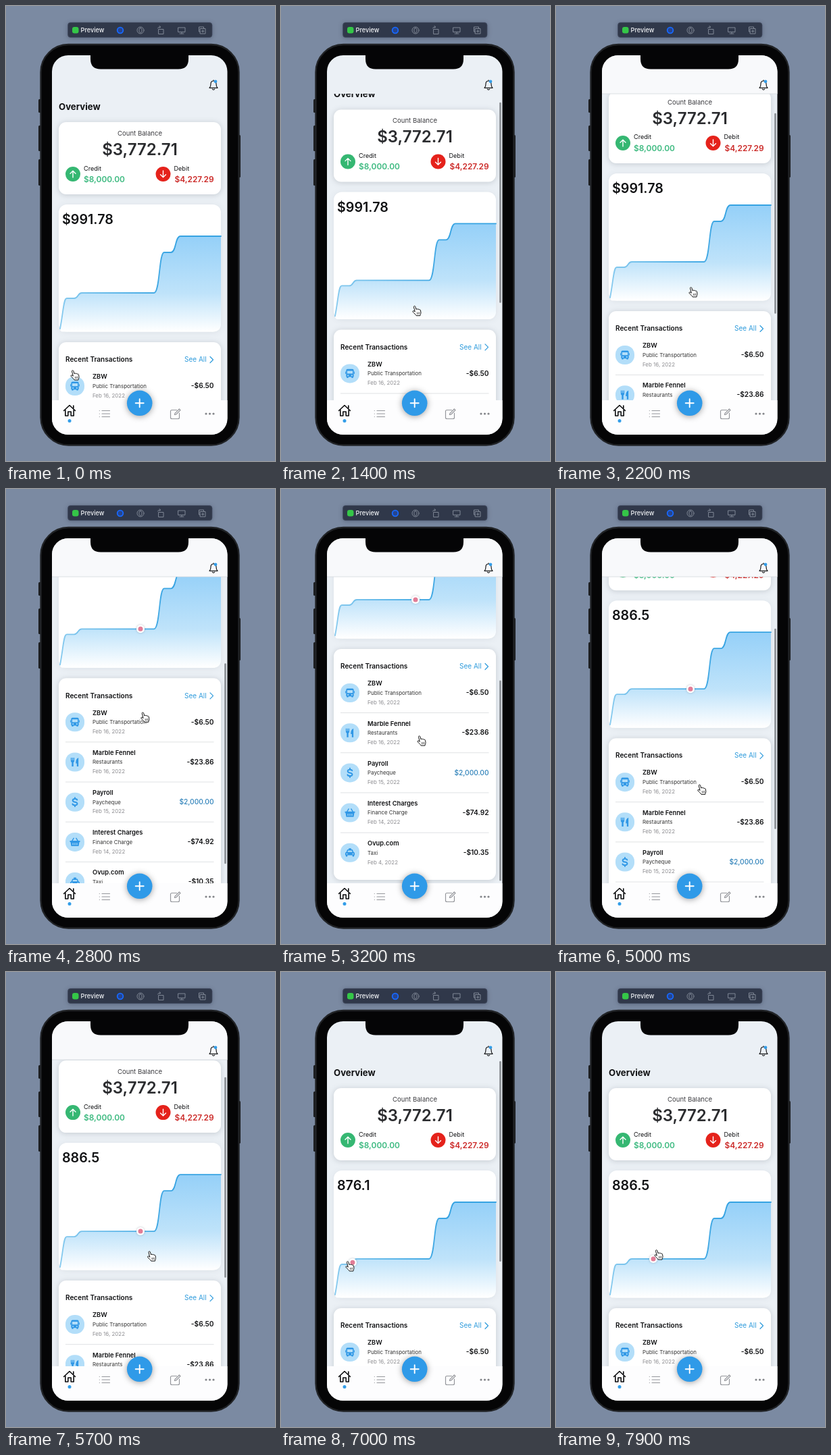
These frames come from a looping animation (398x674 px, 8 s). An HTML page:

```html
<!DOCTYPE html>
<html lang="en">
<head>
<meta charset="utf-8">
<title>Budget overview</title>
<style>
html, body { margin: 0; width: 100%; height: 100%; overflow: hidden; background: #7b8aa2; }
svg { display: block; }
text { font-family: Inter, Roboto, sans-serif; fill: #111214; white-space: pre; }
.semi { font-weight: 600; }
.bold { font-weight: 700; }
.end { text-anchor: end; }
.mid { text-anchor: middle; }
.card { fill: #fff; filter: drop-shadow(0 1.500px 4px rgba(40, 50, 65, .2)); }
.soft { filter: drop-shadow(0 1px 4px rgba(40, 50, 65, .08)); }
.tools { filter: drop-shadow(0 1px 3px rgba(20, 28, 45, .3)); }
.line { fill: none; stroke-linecap: round; stroke-linejoin: round; }
.sub { font-size: 7.95px; fill: #333; }
.date { font-size: 7.95px; fill: #8c8c90; }
.name { font-size: 9.3px; font-weight: 600; }
.amount { font-size: 10.2px; font-weight: 600; text-anchor: end; }
.plus { fill: #2f9ae8; filter: drop-shadow(0 1px 5px rgba(0, 0, 0, .38)); }
</style>
</head>
<body>
<svg width="398" height="674" viewBox="0 0 398 674">
  <defs>
    <clipPath id="screen"><rect x="68" y="73" width="259.500" height="562" rx="24"/></clipPath>
    <clipPath id="view"><rect x="68" y="130" width="259.500" height="454.500"/></clipPath>
    <linearGradient id="area" x1="0" y1="341" x2="0" y2="482" gradientUnits="userSpaceOnUse">
      <stop offset="0" stop-color="#95d0f8"/>
      <stop offset=".6" stop-color="#bfe3fa"/>
      <stop offset="1" stop-color="#fff"/>
    </linearGradient>
    <linearGradient id="stroke" x1="80" y1="0" x2="250" y2="0" gradientUnits="userSpaceOnUse">
      <stop offset="0" stop-color="#85c9ee"/>
      <stop offset="1" stop-color="#36a3e2"/>
    </linearGradient>
    <symbol id="bus" viewBox="-8 -8 16 16" overflow="visible">
      <path fill="#2f97e6" fill-rule="evenodd" d="M-4-7H4Q6-7 6-5V4.500Q6 5.500 5 5.500V7H2.500V5.500H-2.500V7H-5V5.500Q-6 5.500-6 4.500V-5Q-6-7-4-7ZM-4.300-4.300V.2H4.300V-4.300ZM-4 2.200V4H-2V2.200ZM2 2.200V4H4V2.200Z"/>
      <path fill="#2f97e6" d="M-7.500-3h1v3.500h-1ZM6.500-3h1v3.500h-1Z"/>
    </symbol>
    <symbol id="food" viewBox="-8 -8 16 16" overflow="visible">
      <path fill="#2f97e6" d="M-6.500-7H-5.300V-3H-4.400V-7H-3.100V-3H-2.200V-7H-1V-2Q-1 0-2.400 .5V7H-5V.5Q-6.500 0-6.500-2ZM5.500-7V7H3V2H1.300Q1-5 5.500-7Z"/>
    </symbol>
    <symbol id="cash" viewBox="-8 -8 16 16" overflow="visible">
      <path class="line" stroke="#2f97e6" stroke-width="2.100" d="M3.500-3.300Q3-5 0-5Q-3.500-5-3.500-2.500Q-3.500-.4 0 0Q3.700 .5 3.700 2.700Q3.700 5 0 5Q-3.400 5-3.800 3M0-7V-5M0 5V7"/>
    </symbol>
    <symbol id="basket" viewBox="-8 -8 16 16" overflow="visible">
      <path class="line" stroke="#2f97e6" stroke-width="1.500" d="M-5-1L-2-6M5-1L2-6"/>
      <path fill="#2f97e6" fill-rule="evenodd" d="M-8-2H8V0H7L5.800 6.500H-5.800L-7 0H-8ZM-3.700 1.500V5H-2.500V1.500ZM-.6 1.500V5H.6V1.500ZM2.500 1.500V5H3.700V1.500Z"/>
    </symbol>
    <symbol id="taxi" viewBox="-8 -8 16 16" overflow="visible">
      <path fill="#2f97e6" fill-rule="evenodd" d="M-2-7H2V-5H4L5.700-1Q7.500-.5 7.500 1V4H6.500V6H4V4H-4V6H-6.500V4H-7.500V1Q-7.500-.5-5.700-1L-4-5H-2ZM-3-3.400L-3.900-1H3.900L3-3.400ZM-5.800 1V2.500H-3.800V1ZM3.800 1V2.500H5.800V1Z"/>
    </symbol>
  </defs>

  <!-- Toolbar -->
  <rect class="tools" x="91.500" y="24.500" width="213.500" height="22" rx="4" fill="#30384a" stroke="#465065" stroke-width=".7"/>
  <rect x="98" y="31" width="9.500" height="9.500" rx="3.200" fill="#35c648"/>
  <text x="110.500" y="39.300" font-size="9.200" style="fill:#f1f3f6;font-weight:500">Preview</text>
  <circle cx="169" cy="36" r="4.300" fill="#26458f" stroke="#1769ff" stroke-width="1.800"/>
  <g class="line" stroke="#7f8795" stroke-width="1">
    <circle cx="199" cy="36" r="5"/>
    <rect x="197" y="32.800" width="4" height="6.400" rx="1.500"/>
    <path d="M226 34.500H233V41.500H226ZM224.500 33Q225 30.500 228.500 31M227 29.500L228.700 31L227 32.500"/>
    <path d="M255 32H265V38.500H255ZM257 41H263M260 39V41"/>
    <path d="M287.500 38H285.500V31H292.500V33M287.500 33.500H295V41H287.500ZM289.500 37.300H293M291.200 35.500V39"/>
  </g>

  <!-- Phone -->
  <g fill="#1c1e21">
    <rect x="48" y="138" width="5" height="20" rx="1.500"/>
    <rect x="48" y="177" width="5" height="38" rx="1.500"/>
    <rect x="48" y="227" width="5" height="39" rx="1.500"/>
    <rect x="342" y="191" width="5" height="63" rx="1.500"/>
  </g>
  <rect x="51.500" y="57" width="293" height="593.500" rx="41" fill="#050506" stroke="#212326" stroke-width="2.400"/>

  <g clip-path="url(#screen)">
    <rect x="68" y="73" width="260" height="562" fill="#ebf0f5"/>
    <g clip-path="url(#view)">
      <g id="content">
        <text class="bold" x="78" y="154" font-size="13.200">Overview</text>

        <rect class="card" x="78" y="172" width="240" height="107" rx="11"/>
        <text class="mid" x="198" y="191.700" font-size="9.600" style="fill:#3c3c40">Count Balance</text>
        <text class="semi mid" x="198" y="220.700" font-size="24" style="fill:#2b2c2f">$3,772.71</text>
        <circle cx="99" cy="249" r="11" fill="#35b772"/>
        <circle cx="232.500" cy="249" r="11" fill="#e5221b"/>
        <path class="line" stroke="#fff" stroke-width="1.400" d="M99 254V244.300M95 248.200L99 244.200L103 248.200M232.500 244V253.700M228.500 249.800L232.500 253.800L236.500 249.800"/>
        <text x="115" y="243.500" font-size="9.100">Credit</text>
        <text class="semi" x="115" y="261" font-size="11.900" style="fill:#3dba80">$8,000.00</text>
        <text x="248.500" y="243.500" font-size="9.100">Debit</text>
        <text class="semi end" x="307.500" y="261" font-size="11.900" style="fill:#cc2b29">$4,227.29</text>

        <rect class="card soft" x="78" y="294" width="240" height="188.500" rx="12"/>
        <text class="semi" id="value" x="83" y="323.300" font-size="19.700"></text>
        <path id="fill" fill="url(#area)"/>
        <path id="curve" class="line" stroke="url(#stroke)" stroke-width="1.800"/>
        <g id="dot">
          <circle r="6" fill="#fff" style="filter:drop-shadow(0 0 1.500px rgba(60,80,100,.35))"/>
          <circle r="3.500" fill="#e27d97"/>
        </g>

        <rect class="card" x="78" y="498" width="240" height="342" rx="11"/>
        <text class="semi" x="88" y="527.300" font-size="10.050">Recent Transactions</text>
        <text x="264" y="527.300" font-size="10" style="fill:#2e9bdc">See All</text>
        <path class="line" stroke="#2e9bdc" stroke-width="1.200" d="M302 519.500L306.500 524L302 528.500"/>
        <g id="rows"></g>
      </g>
    </g>

    <g id="header">
      <rect x="68" y="73" width="260" height="57" fill="#f8f9fb"/>
      <path d="M68 130H328" stroke="#d3d7dc" stroke-width=".8"/>
    </g>
    <rect id="bar" x="323.200" width="2.500" height="297" rx="1.250" fill="#85898e"/>
    <path d="M125 72V78.500Q125 93.500 140 93.500H255Q270 93.500 270 78.500V72Z" fill="#050506"/>
    <path class="line" stroke="#17181a" stroke-width="1.200" d="M301 121.300Q303 119.500 303 115.500Q303 111 307 111Q311 111 311 115.500Q311 119.500 313 121.300ZM305.300 123.200Q307 125 308.700 123.200M307 110.800V109.800"/>
    <circle cx="310" cy="111.800" r="2.400" fill="#339de8"/>

    <!-- Tab bar -->
    <rect x="68" y="584" width="260" height="51" fill="#fdfdfe"/>
    <path class="line" stroke="#0d0e10" stroke-width="1.600" d="M85.500 599.500L94 591.500L102.500 599.500M87.800 598V607H91.800V601H96.200V607H100.200V598M99.800 592V596"/>
    <circle cx="94" cy="614.500" r="2.500" fill="#329de8"/>
    <g class="line" stroke="#94969b" stroke-width="1.200">
      <path d="M142 599.500H153.500M142 604H153.500M142 608.500H153.500M138.300 599.500h.1M138.300 604h.1M138.300 608.500h.1"/>
      <path d="M252.500 598.500H245.500Q243.500 598.500 243.500 600.500V609.500Q243.500 611.500 245.500 611.500H254.500Q256.500 611.500 256.500 609.500V603M249.500 605.500L250 603.300L256.300 597L258 598.700L251.700 605Z"/>
    </g>
    <g fill="#828489"><circle cx="296" cy="604" r="1.600"/><circle cx="301.500" cy="604" r="1.600"/><circle cx="307" cy="604" r="1.600"/></g>
    <circle class="plus" cx="197.700" cy="588.300" r="18.800"/>
    <path class="line" stroke="#fff" stroke-width="1.900" d="M191.700 588.300H203.700M197.700 582.300V594.300"/>
  </g>

  <g id="cursor" stroke="#111">
    <path fill="#fff" stroke-linejoin="round" d="M-4.500-5.800C-4.900-7.300-2.700-7.900-2.200-6.400L-.9-2.200C-.7-3.300 1-3.300 1.300-2.200C1.700-3 3.200-2.800 3.500-1.700C4-2.300 5.300-1.900 5.500-.8L6 2.300C6.200 4.500 5 5 5 7H-.8C-1.500 5.200-4.200 3.500-5.700 1.600C-6.600 .4-5.200-.7-4 .2L-2.700 1.200Z"/>
    <path class="line" stroke-width=".6" d="M.3 2.300L.6 4.800M2 2.200L2.300 4.700M3.700 2L4 4.500"/>
  </g>
</svg>
<script>
const $ = id => document.getElementById(id);
const LOOP = 8000, TOUCH = 2350;

const line = "M80 478C85 452 85 433 90 433H101C107 433 106 425 112 425H219" +
  "C228 425 226 365 234 365H244C252 365 250 341 258 341H318";
$("curve").setAttribute("d", line);
$("fill").setAttribute("d", line + "V470.5Q318 482.5 306 482.5H84Q80 482.5 80 478Z");

const rows = [
  ["bus", "ZBW", "Public Transportation", "Feb 16, 2022", "-$6.50"],
  ["food", "Marble Fennel", "Restaurants", "Feb 16, 2022", "-$23.86"],
  ["cash", "Payroll", "Paycheque", "Feb 15, 2022", "$2,000.00"],
  ["basket", "Interest Charges", "Finance Charge", "Feb 14, 2022", "-$74.92"],
  ["taxi", "Ovup.com", "Taxi", "Feb 4, 2022", "-$10.35"]
];
$("rows").innerHTML = rows.map(([icon, name, kind, date, sum], i) => {
  const income = sum[0] === "$" ? ' style="fill:#2c80b9;font-weight:500"' : "";
  return `<g transform="translate(0 ${563 + 59.2 * i})">
    <rect x="88" y="-14" width="28" height="28" rx="13" fill="#b3def9"/>
    <use href="#${icon}" x="94.500" y="-7.500" width="15" height="15"/>
    <text class="name" x="128" y="-10.700">${name}</text>
    <text class="sub" x="128" y="2.800">${kind}</text>
    <text class="date" x="128" y="16.800">${date}</text>
    <text class="amount" x="307.500" y="3.200"${income}>${sum}</text>
    ${i < 4 ? '<path d="M88 29.500H307.500" stroke="#d9dbde" stroke-width=".8"/>' : ""}
  </g>`;
}).join("");

// Monotone cubic through [time, value] keys
function track(keys) {
  const slope = keys.slice(1).map((k, i) => (k[1] - keys[i][1]) / (k[0] - keys[i][0]));
  const tan = keys.map((_, i) => {
    const a = slope[i - 1] || 0, b = slope[i] || 0;
    return a * b > 0 ? 2 * a * b / (a + b) : 0;
  });
  return t => {
    const i = keys.findIndex(k => k[0] > t) - 1;
    if (i === -2) return keys[keys.length - 1][1];
    if (i < 0) return keys[0][1];
    const [t0, v0] = keys[i], [t1, v1] = keys[i + 1], d = t1 - t0, u = (t - t0) / d;
    const w = u * u * (3 - 2 * u), r = 1 - u;
    return v0 + (v1 - v0) * w + d * u * r * (r * tan[i] - u * tan[i + 1]);
  };
}

const scroll = track([[1100, 0], [1700, 40], [2200, 46], [2700, 200], [3200, 261], [3700, 261],
  [4300, 178], [4800, 140], [5300, 110], [5700, 41], [6200, 4], [6500, 0]]);
const handX = track([[0, 102], [1200, 200], [2200, 203], [3200, 208], [4300, 216], [5700, 215.5],
  [6100, 216], [6500, 200], [7000, 102], [7300, 96], [7600, 97], [7900, 152]]);
const handY = track([[0, 547], [1200, 470], [1700, 430], [2200, 424], [2600, 330], [3200, 373],
  [3700, 404], [4300, 487], [4800, 500], [5250, 370], [5700, 421], [6100, 462], [6500, 445],
  [7000, 436], [7300, 439], [7600, 438], [7900, 419]]);
const dotX = track([[6400, 199], [7000, 106], [7300, 95], [7600, 97], [7900, 144]]);

const clamp = v => Math.max(0, Math.min(1, v));
const smooth = v => (v = clamp(v), v * v * (3 - 2 * v));
const move = (id, x, y) => $(id).setAttribute("transform", `translate(${x.toFixed(2)} ${y.toFixed(2)})`);

function draw(now) {
  const t = now % LOOP, s = scroll(t), x = dotX(t), touched = t >= TOUCH;
  move("content", 0, -s);
  move("cursor", handX(t), handY(t));
  move("dot", x, 433 - 8 * smooth((x - 102) / 10));
  $("dot").style.display = touched ? "" : "none";
  $("value").textContent = !touched ? "$991.78" : x < 108 ? "876.1" : "886.5";
  $("header").style.opacity = clamp((s - 22) / 16);
  $("bar").setAttribute("y", 132 + s * .58);
  $("bar").style.opacity = Math.min(clamp((t - 1100) / 150), clamp((7900 - t) / 250));
  requestAnimationFrame(draw);
}
draw(0);
</script>
</body>
</html>
```
